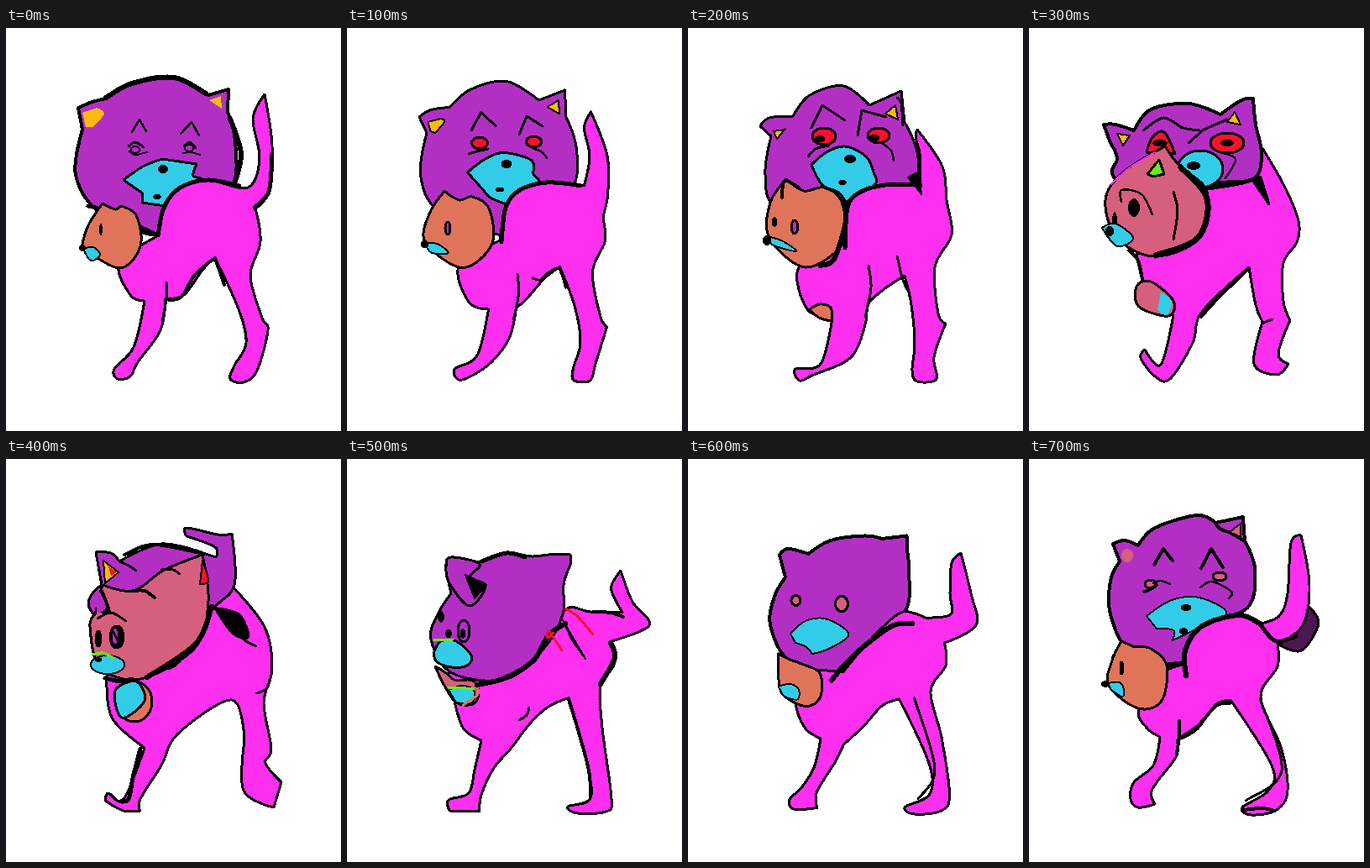
An HTML page for the animation above (0.8 s loop, 399x480 px).

```html
<!DOCTYPE html>
<html lang="en">
<head>
<meta charset="utf-8">
<title>Walking cats</title>
<style>
html, body { margin: 0; width: 100%; height: 100%; overflow: hidden; background: #fff; }
svg { display: block; width: 100%; height: 100%; }
g { visibility: hidden; animation: show .8s step-end infinite; }
path, ellipse { stroke-linecap: round; stroke-linejoin: round; shape-rendering: crispEdges; }
@keyframes show { 0% { visibility: visible; } 12.5%, 100% { visibility: hidden; } }
</style>
</head>
<body>
<svg id="stage" viewBox="0 0 399 480"></svg>
<script>
const ink = {
  B: '#000', P: '#b32fc4', K: '#ff2ff0', C: '#33cce8', O: '#e0745a', R: '#d65f7d',
  Y: '#ffb90c', E: '#ff1030', G: '#66ee11', D: '#4d1650'
};

// add(name, style, points). Style: "-" open line or "o" ellipse (centre, radii),
// then ink and line width. "!" after a point makes a sharp corner.
function arched(add) {
  add('head', 'P4', '86,95! 103,88 119,84! 150,66 195,58 241,80! 265,73! 264,100! 273,135 270,190 230,230 180,247 112,220 83,175 91,121!');
  add('crown', '-B6', '119,83 150,66 200,59 238,78');
  add('nape', '-B6', '267,108 280,150 271,189');
  add('chin', '-B5', '98,212 118,218 181,247');
  add('earL', 'Y0', '91,101! 108,95! 117,102 104,118! 95,118!');
  add('earR', 'Y0', '242,86! 256,81! 257,96!');
  add('browL', '-B2.5', '150,124 159,109! 167,123');
  add('browR', '-B2.5', '208,126 221,112! 230,128');
  add('lidL', '-B3', '146,141 154,136 164,142');
  add('lidR', '-B3', '212,141 219,136 226,143');
  add('bagL', '-B2', '147,147 154,151 168,148');
  add('bagR', '-B2', '211,149 220,148 231,151');
  add('eyeL', 'oP2', '154,145 5,4');
  add('eyeR', 'oP2', '218,143 5,4');
  add('muzzle', 'C3', '140,181! 163,165 186,156! 227,162! 223,176 232,183 190,212! 162,208! 163,197!');
  add('nostrilA', 'oB0', '187,168 6,5');
  add('nostrilB', 'oB0', '180,201 5,3');
  add('body', 'K3', '180,248! 188,214 206,191 240,181 288,190 302,155 294,108 308,79! 317,140 313,195 297,215! 303,255 291,295 305,345 312,360 299,408 283,422 267,418 272,402 286,375 277,335 249,274! 235,287 212,318 190,322! 184,360 157,398 148,415 133,418 129,406 152,380 165,325! 148,318 135,280');
  add('back', '-B5', '181,247 188,214 206,191 240,181 278,188');
  add('tail', '-B5', '317,150 313,195 296,214');
  add('belly', '-B4', '260,306 249,274! 225,294 209,320 194,324');
  add('leg', '-B3', '191,303 191,322 186,350');
  add('kid', 'O3', '115,209! 130,216 136,212! 155,223 160,260 135,286 90,261! 98,235');
  add('nose', 'C2', '92,263! 104,261 112,270 101,277');
  add('tip', 'oB0', '91,262 4,4');
  add('kidEye', 'oB0', '113,240 2,7');
}

function falling(add) {
  add('head', 'P3', '86,117! 97,107 125,105! 145,80 185,69 216,92! 254,75! 258,112! 273,148 270,185 230,220 180,245 105,215 92,175 99,129!');
  add('earL', 'Y2', '102,123! 115,121! 115,121 106,132! 104,128!');
  add('earR', 'Y2', '235,102! 247,92! 250,109!');
  add('flap', '-B3', '249,83 254,90 256,116');
  add('browL', '-B3', '147,119 160,92! 187,110');
  add('browR', '-B3', '202,128 207,98! 236,106');
  add('eyeL', 'oE3', '162,129 14,10');
  add('eyeR', 'oE3', '227,128 13,9');
  add('pupilL', 'oB0', '157,132 6,4');
  add('pupilR', 'oB0', '222,131 6,4');
  add('bagL', '-B3', '143,153 152,144 168,140');
  add('bagR', '-B2.5', '231,137 242,146 245,158');
  add('muzzle', 'C3', '147,163! 165,148 187,141 212,153 221,172 222,187 188,207! 178,195 160,187');
  add('nostrilA', 'oB0', '193,156 7,5');
  add('nostrilB', 'oB0', '184,184 5,3');
  add('body', 'K3', '185,258! 190,214 204,196 235,187 277,185! 276,150 271,130 273,121! 303,165 308,205 314,235 312,252 294,285 298,340 307,352! 293,392 296,418 273,421 267,408 270,375 266,330 258,295! 235,310 216,327 213,345! 203,378 188,397 150,413 133,420 128,406 158,400 172,345! 142,335 132,285');
  add('back', '-B5', '187,262 190,214 204,196 235,187 277,187');
  add('scruff', 'B2', '262,178! 275,171! 278,198!');
  add('kid', 'O3', '117,180! 138,194 162,190 183,207 185,255 140,285 97,250 98,208');
  add('rim', '-B6', '186,207 188,230 174,275 158,283');
  add('kidEar', '-B4', '112,202 115,182 132,190');
  add('kidEyeL', 'oB2', '103,231 2,5');
  add('kidEye', 'oP3', '127,237 4,8');
  add('nose', 'C2', '94,248! 113,254 129,266 100,258');
  add('tip', 'oB0', '94,253 5,6');
  add('paw', 'O3', '145,335! 157,329 170,333 171,349! 156,345');
  add('leg', '-B3', '215,283 218,310 211,344');
  add('belly', '-B3', '261,312 256,300 253,290 251,280 249,272');
}

function turning(add) {
  add('body', 'K3', '278,143! 305,190 321,230 319,255 303,280 303,325 311,348! 297,388 309,400! 295,413 268,400 278,350! 270,330 262,285! 206,338 195,375 168,418 150,415 133,393 138,383! 157,401 172,342! 145,330 128,270! 200,200');
  add('head', 'P4', '89,115! 103,115 125,122! 145,97 190,90 228,103! 253,86 267,84! 270,115 277,150 267,180 215,188 170,230 103,180 105,155 97,137!');
  add('earL', 'Y2', '105,126! 120,128! 112,140!');
  add('earR', 'Y2', '236,112! 245,100! 252,115!');
  add('browL', '-B3', '168,109 184,119 203,122');
  add('browR', '-B3', '190,137 208,121! 236,109');
  add('crease', '-B3', '136,122 160,107 182,119');
  add('eyeL', 'E3', '140,148! 147,130 161,124 174,150!');
  add('eyeR', 'oE3', '236,137 20,12');
  add('pupilL', 'oB0', '156,137 9,4');
  add('pupilR', 'oB0', '236,137 8,4');
  add('bag', '-B2.5', '227,148 246,156 234,179');
  add('muzzle', 'oC3', '204,168 27,22');
  add('nostril', 'oB0', '196,164 8,5');
  add('jaw', '-B5', '213,191 250,185 275,178');
  add('scruff', 'B3', '266,181! 276,178! 286,210!');
  add('kid', 'R3', '91,205 112,172 162,141! 180,165 212,195 203,250 150,272 105,250');
  add('rim', '-B7', '181,166 212,203 201,250 151,271');
  add('gap', '-K2', '98,186 119,167 150,148');
  add('kidEar', 'G3', '141,174! 155,157! 161,174! 148,177!');
  add('kidEyeL', 'oB0', '102,229 3,10');
  add('kidEyeR', 'oB0', '125,214 7,11');
  add('lid', '-B2.5', '110,207 110,193 134,198 147,222');
  add('cheek', '-B3', '172,195 177,218 172,252');
  add('nose', 'C2', '87,238! 103,233 124,250 105,260');
  add('tip', 'oB0', '96,242 5,6');
  add('paw', 'R3', '128,308 145,302 172,325 166,343 131,332');
  add('pad', 'C0', '157,314! 170,326 164,342 153,336!');
  add('chest', '-B4', '119,265 130,277 135,300');
  add('belly', '-B4', '205,344 225,322 261,287');
  add('hock', '-B3', '277,352 290,347');
}

function bowing(add) {
  add('body', 'K3', '270,152! 308,200 317,250 307,290 316,345 309,362 328,385! 319,415! 283,395 284,335! 269,287 205,327 185,365 160,405 160,419! 140,419 118,407! 122,398 140,405 165,344! 126,308 120,258! 200,220');
  add('head', 'P3', '107,111! 125,112 135,122! 185,101 238,113! 250,117! 249,105 215,92! 215,82 252,90 269,89! 272,150 245,180 190,250 102,182 114,150!');
  add('crown', '-B4', '141,114 175,102 236,113');
  add('earL', 'Y2', '116,121! 134,135! 118,148!');
  add('earIn', 'E0', '122,128! 132,135! 125,139!');
  add('flap', '-B3', '135,122 146,127 155,133');
  add('kid', 'R3', '115,150! 152,157 187,133 234,114! 241,170 225,225 160,262 112,248 100,200 106,185!');
  add('creaseL', '-B4', '151,157 165,157 177,165');
  add('creaseR', '-B3', '185,132 199,132 207,137');
  add('slit', 'E2', '234,121! 241,145 231,149!');
  add('rim', '-B6', '245,176 226,220 168,260');
  add('ear', 'B0', '113,150! 125,184 106,180!');
  add('earGap', 'P0', '105,163! 111,158 119,177 109,184!');
  add('eyeL', 'oB2.5', '110,214 3,9');
  add('eyeR', 'oB3', '132,212 8,13');
  add('pupil', 'oP1', '130,211 4,10');
  add('glint', '-B3', '128,206 136,222');
  add('brow', '-B3', '109,190 125,183 143,193');
  add('nose', 'oC2', '121,245 20,11');
  add('lip', '-G3', '103,233 115,231 128,237');
  add('tip', 'oB0', '110,239 4,3');
  add('scruff', 'B2', '248,177! 278,185 289,212 270,208');
  add('spine', '-B3', '260,183 281,213 298,223');
  add('pawBack', 'oO3', '153,289 21,24');
  add('paw', 'C3', '130,276 155,265 165,288 138,308');
  add('chest', '-B5', '118,261 137,265 150,262');
  add('hip', '-B3', '314,262 311,273 299,279');
  add('shin', '-B5', '160,345 151,380 146,405 136,408');
}

function striding(add) {
  add('body', 'K3', '185,262! 222,240 240,210 262,178 290,182 328,183! 316,160 316,148 326,133! 340,170 360,198 315,217! 318,245 302,270 304,320 315,405 308,420 275,422 263,414 290,404 285,360 263,285! 240,295 218,315 195,345 175,368 160,400 158,420! 122,419! 121,406 145,398 152,370 160,335! 138,320 126,280 122,255');
  add('hip', '-B6', '314,219 319,237 302,268');
  add('rump', '-B4', '294,182 314,183 329,188');
  add('head', 'P3', '118,128 124,117 157,123! 190,112 220,116 240,114 266,114! 266,126! 258,150 257,185 235,225 190,262 125,255 100,215 108,185 124,160!');
  add('crown', '-B5', '160,122 190,112 212,117');
  add('ear', 'P3', '118,128 124,117 158,125 146,141 165,151 146,175 122,148');
  add('earIn', 'B2', '141,138! 166,150! 152,166!');
  add('eyeL', 'oB0', '112,188 4,7');
  add('eyeR', 'oP3', '139,205 7,13');
  add('pupil', 'oB2', '138,208 2,5');
  add('spot', 'oB0', '121,208 4,5');
  add('muzzle', 'C3', '104,229 112,217 130,217 148,234 143,246 125,248 109,243 104,236');
  add('lip', '-G3', '103,216 126,215');
  add('kid', 'R3', '105,247! 117,254 128,263 150,264 157,279 150,292 130,290 116,270');
  add('nose', 'C2', '121,275! 137,270 151,275 149,290 130,290!');
  add('kidLip', '-G3', '120,272 151,274');
  add('pawRim', '-O3', '153,267 156,280 138,293');
  add('back', '-B6', '155,269 188,261 222,240 240,210 260,196');
  add('scruff', 'B2', '257,192! 284,238! 268,216!');
  add('markA', '-E3', '260,178 275,188 293,209');
  add('markB', '-E3', '256,228 240,204! 238,213 246,207');
  add('thigh', '-B4', '264,285 287,366 290,403');
  add('belly', '-B3', '217,296 214,305 205,311');
}

function rising(add) {
  add('shade', 'D3', '331,174! 345,195 325,228 299,222!');
  add('head', 'P4', '100,101! 114,97 130,103! 150,82 200,67 222,76! 255,69! 257,98! 269,130 262,175 215,200 180,243 120,228 97,185 97,145 108,122!');
  add('flap', '-B4', '222,77 229,84 240,88 257,98');
  add('earL', 'oR0', '117,115 7,8');
  add('earR', 'R2', '239,87! 252,77! 252,93!');
  add('browL', '-B4', '149,126 160,107! 171,121');
  add('browR', '-B4', '205,130 217,107! 231,129');
  add('eyeL', 'oR3', '145,149 7,5');
  add('eyeR', 'oR3', '227,140 8,5');
  add('lidL', '-B4', '137,158 143,156 152,150');
  add('bagL', '-B2.5', '148,148 157,145 168,149');
  add('bagR', '-B2.5', '204,153 218,146 241,158 238,166');
  add('muzzle', 'C2', '140,187! 170,168 203,165 235,184 192,206 171,216! 172,204 152,202!');
  add('nostrilA', 'oB0', '187,177 6,4');
  add('nostrilB', 'oB0', '184,205 5,4');
  add('body', 'K3', '185,245! 193,212 220,194 250,186 275,196! 298,187 308,160 312,100 324,91! 334,150 326,198 296,221! 296,247 276,284 300,343 308,395 295,418 265,424 254,415 285,395 289,365 240,287! 222,293 200,322 176,335! 175,355 147,393 150,411! 130,415 121,405 125,385 148,365 156,331! 140,320 131,298 160,255');
  add('back', '-B6', '187,258 186,228 206,199 250,186 275,196');
  add('neck', '-B5', '160,250 173,244 185,244');
  add('tail', '-B5', '276,198 294,217 318,211');
  add('leg', '-B4', '179,312 179,330 176,350');
  add('belly', '-B4', '180,332 201,318 223,294 239,291');
  add('thigh', '-B3', '275,285 301,371 258,407');
  add('foot', '-B4', '256,418 277,416 293,419');
  add('kidEar', 'K2', '99,236! 109,221! 111,238!');
  add('kid', 'O3', '110,217! 126,224! 145,226 164,246 158,288 130,297 95,270 99,240');
  add('kidEye', '-B5', '110,243 110,255');
  add('nose', 'C2', '94,267! 108,266 113,275 111,283 98,275!');
  add('tip', 'oB0', '91,268 5,4');
}

function build(draw) {
  const parts = new Map();
  draw((name, style, text) => {
    const [, kind, key, width] = style.match(/^([-o]?)(\w)([\d.]+)$/);
    const pts = text.split(' ').map(t => {
      const [x, y] = t.replace('!', '').split(',').map(Number);
      return { x, y, sharp: t.endsWith('!') };
    });
    parts.set(name, { kind, key, width, pts });
  });
  return parts;
}

// Halfway pose from the parts that two poses share.
function between(a, b) {
  const mid = new Map();
  for (const [name, q] of b) {
    const p = a.get(name);
    if (!p || p.kind !== q.kind || p.pts.length !== q.pts.length) continue;
    const pts = q.pts.map((v, i) => ({ x: (v.x + p.pts[i].x) / 2, y: (v.y + p.pts[i].y) / 2, sharp: v.sharp }));
    mid.set(name, { ...q, pts });
  }
  return mid;
}

// Smooth curve through the points; corners get no tangent.
function curve(pts, open) {
  const n = pts.length;
  const at = i => open ? pts[Math.min(Math.max(i, 0), n - 1)] : pts[(i + n) % n];
  const handle = (i, dir) => {
    const p = at(i), a = at(i - 1), b = at(i + 1), k = p.sharp ? 0 : dir / 6;
    return `${p.x + (b.x - a.x) * k},${p.y + (b.y - a.y) * k}`;
  };
  let d = `M${pts[0].x},${pts[0].y}`;
  for (let i = 0; i < n - (open ? 1 : 0); i++) {
    const end = at(i + 1);
    d += `C${handle(i, 1)} ${handle(i + 1, -1)} ${end.x},${end.y}`;
  }
  return open ? d : d + 'Z';
}

function markup({ kind, key, width, pts }) {
  const open = kind === '-';
  const paint = `fill="${open ? 'none' : ink[key]}" stroke="${open ? ink[key] : ink.B}" stroke-width="${width}"`;
  if (kind === 'o') {
    const [c, r] = pts;
    return `<ellipse cx="${c.x}" cy="${c.y}" rx="${r.x}" ry="${r.y}" ${paint}/>`;
  }
  return `<path d="${curve(pts, open)}" ${paint}/>`;
}

const [arch, fall, turn, bow, stride, rise] = [arched, falling, turning, bowing, striding, rising].map(build);
const poses = [arch, between(arch, fall), fall, turn, bow, stride, between(stride, rise), rise];

document.getElementById('stage').innerHTML = poses.map((pose, i) =>
  `<g style="animation-delay:${(i - poses.length) * 100}ms">${[...pose.values()].map(markup).join('')}</g>`
).join('');
</script>
</body>
</html>
```
